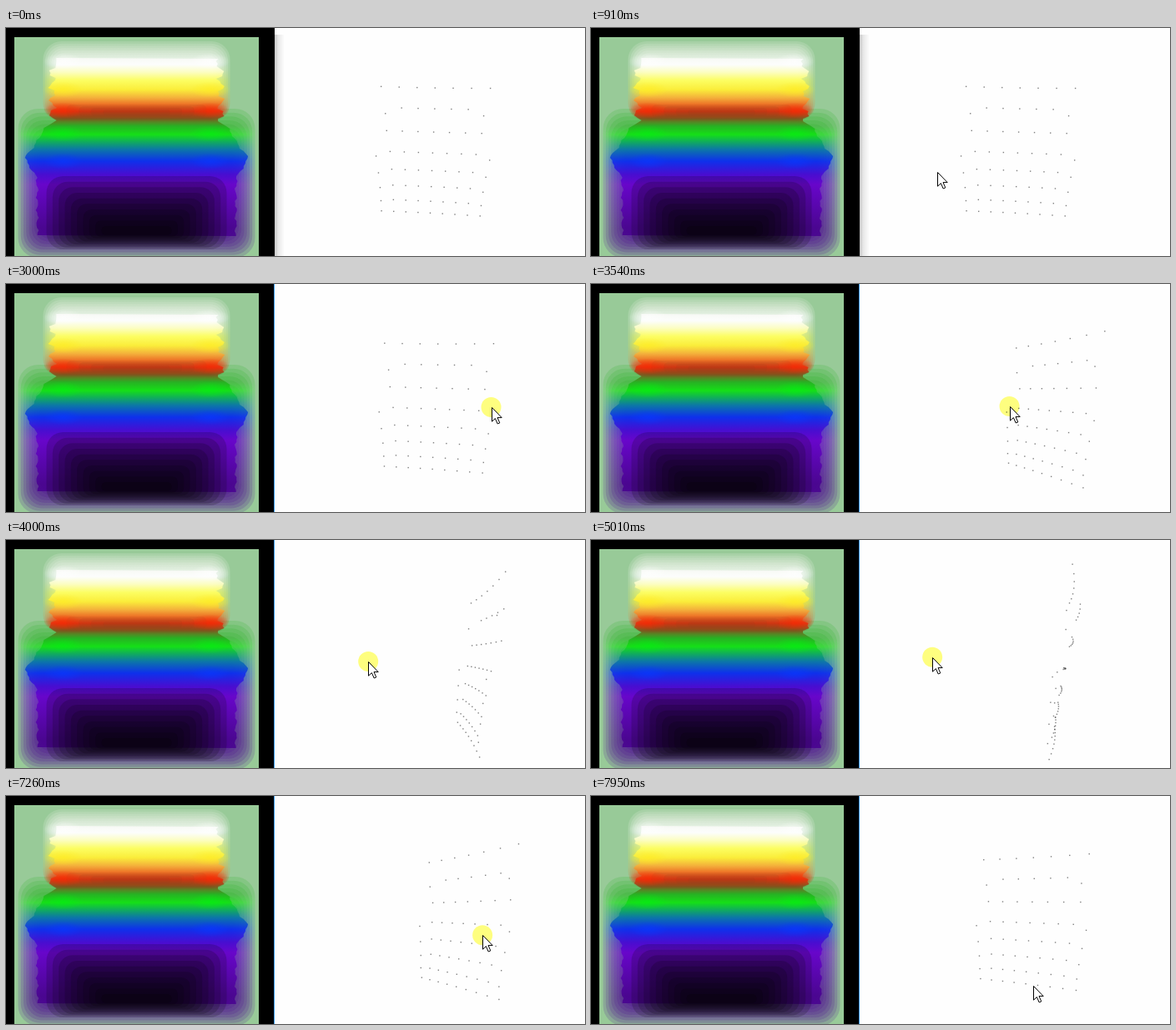
Write an HTML page with a canvas that moves like this. It is 694 px wide and 274 px high and loops after 8 s.

```html
<!DOCTYPE html>
<html lang="en">
<head>
<meta charset="utf-8">
<title>Point cloud orbit</title>
<style>
  html, body { margin: 0; width: 100%; height: 100%; overflow: hidden; background: #fefefe; }
  canvas { position: absolute; left: 0; top: 0; }
</style>
</head>
<body>
<canvas id="map" width="322" height="274"></canvas>
<canvas id="view" width="694" height="274"></canvas>
<script>
const LOOP = 8000, STEP = 77.18;
const rad = d => d * Math.PI / 180;
const mix = (a, b, k) => a + (b - a) * k;
const clamp = (v, a = 0, b = 1) => Math.min(b, Math.max(a, v));

/* ---------- height map ---------- */
const MID = 156.5;
const HUES = [[24, "#f2f3ec"], [44, "#ffffff"], [53, "#ffffc4"], [63, "#ffff60"], [74, "#fdee38"],
              [84, "#f6ae38"], [100, "#e82c0c"], [109, "#80501a"], [118, "#20b01c"], [128, "#10e012"],
              [146, "#0874a8"], [160, "#0a2cee"], [176, "#4608d2"], [188, "#6600cc"], [240, "#480090"]];

// Half width of the solid body at height y, with a ragged rim.
function bodyHalf(y) {
  const rim = 4 * Math.sin(y * .38) + 2 * Math.sin(y * .9);
  if (y < 114) return 101 - Math.max(0, 46 - y) + rim;
  return 119 - 18 * Math.exp((114 - y) / 10) + 14 * Math.exp(-(((y - 157) / 15) ** 2)) + rim / 3;
}

function drawMap() {
  const c = document.getElementById("map").getContext("2d");
  c.fillStyle = "#000";
  c.fillRect(0, 0, 322, 274);
  c.beginPath();
  c.rect(10, 11, 293, 263);
  c.clip();
  c.fillStyle = "#98ca98";
  c.fillRect(0, 0, 322, 274);

  const hue = from => {
    const grad = c.createLinearGradient(0, 0, 0, 274);
    HUES.filter(([y]) => y >= from).forEach(([y, col]) => grad.addColorStop(y / 274, col));
    return grad;
  };
  // Nested boxes [half width, top, bottom, radius] make the stepped contours.
  const nest = (n, outer, inner, fill, alpha) => {
    c.fillStyle = fill;
    c.globalAlpha = alpha;
    for (let i = 0; i < n; i++) {
      const [w, top, bottom, r] = outer.map((v, j) => mix(v, inner[j], i / (n - 1)));
      c.beginPath();
      c.roundRect(MID - w, top, 2 * w, bottom - top, r);
      c.fill();
    }
  };
  nest(9, [142, 97, 276, 24], [116, 134, 250, 14], hue(118), .17);
  nest(9, [112, 16, 112, 22], [92, 38, 108, 8], hue(0), .17);

  c.fillStyle = hue(0);
  c.globalAlpha = .85;
  c.beginPath();
  for (let y = 36; y <= 250; y += 3) c.lineTo(MID - bodyHalf(y), y);
  for (let y = 250; y >= 36; y -= 3) c.lineTo(MID + bodyHalf(y), y);
  c.fill();

  nest(10, [108, 178, 266, 20], [42, 238, 249, 5], "#000", .17);
  nest(4, [84, 92, 107, 6], [40, 98, 105, 4], "#7a4a20", .1);

  // Purer colour near both flanks of each band.
  const spots = [[40, "#ffffff"], [74, "#ffec20"], [99, "#f82800"], [127, "#00f010"], [160, "#0838ff"]];
  for (const [y, col] of spots) for (const side of [-88, 88]) {
    const glow = c.createRadialGradient(0, 0, 0, 0, 0, 24);
    glow.addColorStop(0, col);
    glow.addColorStop(1, col + (col.length > 7 ? "" : "00"));
    c.save();
    c.globalAlpha = .6;
    c.translate(MID + side, y);
    c.scale(1, .4);
    c.fillStyle = glow;
    c.fillRect(-24, -24, 48, 48);
    c.restore();
  }
}

/* ---------- point cloud ---------- */
// height and depth of each row; the rest of the grid follows from its index
const ROWS = [[-.238, .2045], [-.149, .225], [-.0445, .206], [.0462, .183],
              [.1215, .172], [.188, .162], [.248, .153], [.297, .152]];

const POINTS = ROWS.flatMap(([y, z], r) => {
  const n = r < 3 ? 7 : 9, k = r - 3;
  const step = r < 3 ? .079 - .005 * r : .0613 - .0045 * k + .0005 * k * k;
  const lip = r === 0 || r === 2 ? 0 : .036 - .0052 * r;
  return Array.from({ length: n }, (_, i) => {
    const end = i === 0 || i === n - 1 ? lip : 0;
    const x = (i - (n - 1) / 2) * step * (1 - 1.6 * end);
    return { x, y: y + end, z: z - .2 * x * x - 1.15 * end };
  });
});
const FOCAL = 330, CX = 507.3, CY = 136.6, ROLL = .032;

function project(p, yaw, pitch) {
  const s = Math.sin(yaw), c = Math.cos(yaw);
  const x = p.x * c + p.z * s, z = p.z * c - p.x * s;
  const k = FOCAL / (1 + z - pitch * p.y);
  const u = x * k, v = (p.y + pitch * z) * k;
  return [CX + u - ROLL * v, CY + v + ROLL * u];
}

/* ---------- pointer and timeline ---------- */
const PATH = [
  [70, 465, 236], [300, 326, 174], [640, 327, 173], [1450, 577, 172], [1910, 580, 161], [2300, 589, 151],
  [2850, 588, 150], [3000, 583, 148], [4000, 435, 146], [4230, 421, 145], [5160, 407, 140],
  [5790, 407, 140], [6330, 589, 203], [6690, 474, 195], [7260, 572, 167], [7600, 622, 162], [7950, 530, 228]
];
const PRESS = 2440, DROP = 5800, GRAB = 6690, FREE = 7610;

function pointerAt(t) {
  const i = clamp(PATH.findIndex(p => p[0] > t) - 1, 0, PATH.length - 2);
  const a = PATH[i], b = PATH[i + 1], k = clamp((t - a[0]) / (b[0] - a[0]));
  return [mix(a[1], b[1], k), mix(a[2], b[2], k)];
}

// Dragging turns the cloud by about half a degree per pixel.
function yawAt(t) {
  if (t < PRESS) return 4.5;
  if (t < GRAB) return 4.5 + .536 * Math.max(0, 588 - pointerAt(Math.min(t, DROP - 20))[0]);
  return 102 - .545 * Math.max(0, pointerAt(Math.min(t, FREE - 10))[0] - 474);
}

const g = document.getElementById("view").getContext("2d");
const ARROW = new Path2D("M.5 .5V17.2L4.4 13.6L7.2 20L9.8 18.9L7 12.6H12.2Z");
const RESIZE = new Path2D("M-11 0L-6-5V-1.5H6V-5L11 0L6 5V1.5H-6V5Z");

function drawPointer(t) {
  if (t < 70) return;
  const [x, y] = pointerAt(t);
  if ((t >= PRESS && t < DROP) || (t >= GRAB && t < FREE)) {
    g.globalCompositeOperation = "multiply";
    g.fillStyle = "#ffff80";
    g.beginPath();
    g.arc(x, y, 12, 0, 7);
    g.fill();
    g.globalCompositeOperation = "source-over";
  }
  const sizing = t > 290 && t < 670;
  const shape = sizing ? RESIZE : ARROW;
  g.save();
  g.translate(Math.round(x), Math.round(y));
  g.fillStyle = sizing ? "#000" : "#fff";
  g.strokeStyle = sizing ? "#fff" : "#000";
  g.fill(shape);
  g.stroke(shape);
  g.restore();
}

// The neighbouring window's shadow fades once this one takes the focus.
function drawEdge(t) {
  const shade = .26 * (1 - clamp((t - 2400) / 290));
  const grad = g.createLinearGradient(321, 0, 334, 0);
  grad.addColorStop(0, `rgba(0,0,0,${shade})`);
  grad.addColorStop(.4, `rgba(0,0,0,${shade * .35})`);
  grad.addColorStop(1, "rgba(0,0,0,0)");
  g.fillStyle = grad;
  g.fillRect(322, 8, 12, 266);
  if (t >= PRESS) {
    g.fillStyle = "#3a9be8";
    g.fillRect(321, 0, 1, 274);
  }
}

function render(t) {
  g.clearRect(0, 0, 694, 274);
  g.fillStyle = "#fefefe";
  g.fillRect(322, 0, 372, 274);
  drawEdge(t);

  const yaw = rad(yawAt(t)), pitch = .035 * clamp((t - 3900) / 1200);
  g.fillStyle = "rgba(60,60,60,.65)";
  for (const p of POINTS) {
    const [x, y] = project(p, yaw, pitch);
    g.fillRect(x - .2, y - .2, 1.4, 1.4);
  }
  drawPointer(t);
}

drawMap();
const start = performance.now();
function tick() {
  const t = (performance.now() - start) % LOOP;
  render(Math.floor(t / STEP + .26) * STEP);
  requestAnimationFrame(tick);
}
tick();
</script>
</body>
</html>
```
